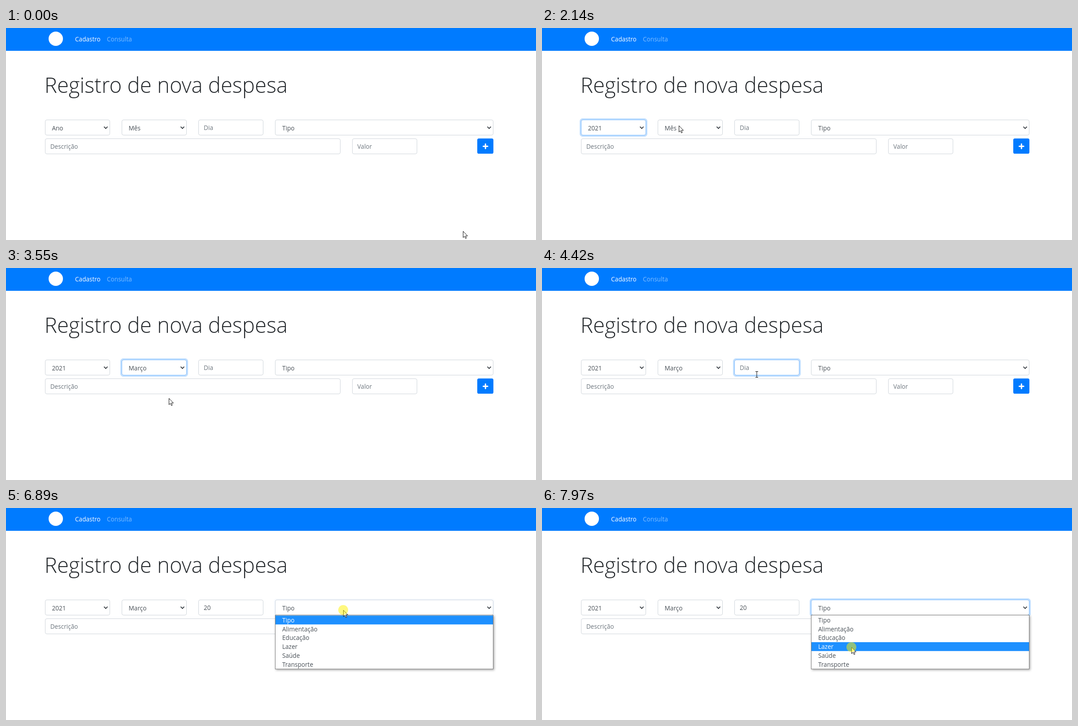
Animation, 1182 px wide and 474 px high, one loop 8000 ms. Source, as an HTML page:

```html
<!DOCTYPE html>
<html lang="pt-BR">
<head>
<meta charset="utf-8">
<title>Registro de nova despesa</title>
<style>
  html, body { margin: 0; width: 100%; height: 100%; overflow: hidden; background: #fff; }
  svg { display: block; width: 1182px; height: 474px; }
  text { font: 400 13.6px "Open Sans", "Noto Sans", sans-serif; fill: #495057; white-space: pre; }
  .title { font-size: 47.3px; font-weight: 300; fill: #212529; }
  .link { fill: #fff; }
  .dim { fill: #fff; opacity: .5; }
  .hint { fill: #6c757d; }
  .box { fill: #fff; stroke: #ced4da; }
  .ring { fill: none; stroke: #007bff; stroke-opacity: .25; stroke-width: 3; }
  .edge { fill: none; stroke: #80bdff; }
  .arrow { fill: none; stroke: #343a40; stroke-width: 1.8; }
  .list { fill: #fff; stroke: #767676; filter: drop-shadow(2px 2px 2.5px rgba(0, 0, 0, .35)); }
  .pick { fill: #1e90ff; }
  .on { fill: #fff; }
</style>
</head>
<body>
<svg viewBox="0 0 1182 474">
  <rect width="1182" height="51" fill="#007bff"/>
  <circle cx="111" cy="24" r="16" fill="#fff"/>
  <text class="link" x="154" y="30">Cadastro</text>
  <text class="dim" x="225" y="30">Consulta</text>
  <text class="title" x="85.8" y="145.3">Registro de nova despesa</text>
  <g id="fields"></g>
  <rect x="1051" y="247" width="36" height="34" rx="3.6" fill="#007bff"/>
  <path d="M1069.3 259.7v9.6M1064.5 264.5h9.6" stroke="#fff" stroke-width="3.2" stroke-linecap="round"/>
  <rect id="caret" y="214" width="1" height="19" fill="#343a40"/>
  <g id="lists"></g>
  <g id="pointer">
    <path id="tip" d="M.5.5V14.6L3.7 11.7 5.8 16.6 8 15.7 5.9 10.9H10.4Z" fill="#fff" stroke="#000" stroke-width=".95"/>
    <path id="beam" d="M-3-6.5H3M0-6.5V6.5M-3 6.5H3" fill="none" stroke="#000"/>
    <circle id="press" r="11" fill="#fff200" fill-opacity=".5"/>
  </g>
</svg>
<script>
const LOOP = 8000, REFRESH = 70;
const ROW = 19.83, LIST_TOP = 240.5, HEIGHT = 34;
const OPEN_DELAY = 130, FOCUS_DELAY = 120, CLOSE_DELAY = 70, FADE = 120;
const TRAVEL = 720, SETTLE = 160, LINGER = 100, PRESS = 145;
const BLINK = 530, KEYS = [5260, 5350];

const $ = id => document.getElementById(id);

function add(parent, tag, attrs, content = '') {
  const el = document.createElementNS('http://www.w3.org/2000/svg', tag);
  for (const key in attrs) el.setAttribute(key, attrs[key]);
  el.textContent = content;
  parent.append(el);
  return el;
}

const click = (at, x, y) => ({ at, x, y });

const fields = [
  { label: 'Ano', col: 0, span: 1, options: ['2020', '2021'], choice: '2021',
    enter: click(750, 145, 225), pick: click(1610, 150, 289) },
  { label: 'Mês', col: 1, span: 1, choice: 'Março',
    options: ['Janeiro', 'Fevereiro', 'Março', 'Abril', 'Maio', 'Junho', 'Julho',
      'Agosto', 'Setembro', 'Outubro', 'Novembro', 'Dezembro'],
    enter: click(2220, 305, 218), pick: click(3330, 330, 306) },
  { label: 'Dia', col: 2, span: 1, typed: '20', enter: click(3820, 479, 238) },
  { label: 'Tipo', col: 3, span: 3, options: ['Alimentação', 'Educação', 'Lazer', 'Saúde', 'Transporte'],
    enter: click(6760, 752, 228), pick: click(7740, 690, 311) },
  { label: 'Descrição', col: 0, span: 4, row: 1 },
  { label: 'Valor', col: 4, span: 1, row: 1 }
];

const clicks = fields.flatMap(f => [f.enter, f.pick]).filter(Boolean);
const entered = fields.filter(f => f.enter);
entered.forEach((f, i) => f.blur = entered[i + 1]?.enter.at ?? Infinity);

function build(f) {
  const g = $('fields'), left = 87.4 + 171.2 * f.col;
  const x = f.x = Math.floor(left) + .5;
  const y = f.y = f.row ? 247.5 : 205.5;
  const w = f.w = Math.round(171.2 * f.span - 27.2);
  const box = { x, y, width: w, height: HEIGHT, rx: 3.6 };
  add(g, 'rect', { ...box, class: 'box' });
  f.glow = add(g, 'g', { opacity: 0 });
  add(f.glow, 'rect', { x: x - 2, y: y - 2, width: w + 4, height: HEIGHT + 4, rx: 5, class: 'ring' });
  add(f.glow, 'rect', { ...box, class: 'edge' });
  f.text = add(g, 'text', { x: left + (f.options ? 15 : 11.3), y: y + (f.options ? 23.5 : 22.5) }, f.label);
  if (!f.options) {
    f.text.setAttribute('class', 'hint');
    return;
  }
  add(g, 'path', { d: `M${x + w - 13} ${y + 15.2}l4 4 4-4`, class: 'arrow' });

  const rows = [f.label, ...f.options];
  f.list = add($('lists'), 'g', {});
  add(f.list, 'rect', { x, y: LIST_TOP - 1, width: w, height: rows.length * ROW + 1.5, class: 'list' });
  f.mark = add(f.list, 'rect', { x: x + .5, width: w - 1, height: ROW, class: 'pick' });
  f.rows = rows.map((row, i) => add(f.list, 'text', { x: left + 15, y: LIST_TOP + 15.3 + i * ROW }, row));
}
fields.forEach(build);

const ramp = (t, start) => Math.min(1, Math.max(0, (t - start) / FADE));
const show = (el, visible) => el.setAttribute('visibility', visible ? 'inherit' : 'hidden');

// Glides to each click in turn and rests there until the next one is due.
function pointerAt(t) {
  let last = click(-Infinity, 1019, 454), { x, y } = last;
  for (const next of clicks) {
    const arrive = next.at - SETTLE;
    const leave = Math.max(0, last.at + LINGER, arrive - TRAVEL);
    if (t <= leave) break;
    const u = Math.min(1, (t - leave) / (arrive - leave)), e = u * u * (3 - 2 * u);
    x = last.x + (next.x - last.x) * e;
    y = last.y + (next.y - last.y) * e;
    last = next;
  }
  return [Math.round(x), Math.round(y)];
}

function valueOf(f, t) {
  if (f.typed) return f.typed.slice(0, KEYS.filter(k => t >= k).length);
  return f.choice && t >= f.pick.at + CLOSE_DELAY ? f.choice : '';
}

function drawList(f, py) {
  const current = Math.max(0, Math.floor((py - LIST_TOP) / ROW));
  f.mark.setAttribute('y', LIST_TOP + current * ROW);
  f.rows.forEach((row, i) => row.setAttribute('class', i === current ? 'on' : ''));
}

function drawCaret(t) {
  const day = fields[2], count = valueOf(day, t).length;
  const start = count === day.typed.length ? KEYS[1] : day.enter.at + CLOSE_DELAY;
  const lit = Math.floor((t - start) / BLINK) % 2 === 0;
  $('caret').setAttribute('x', 441 + count * 7.8);
  show($('caret'), t >= start && t < KEYS[1] + BLINK && lit);
}

function draw(t) {
  const [px, py] = pointerAt(t - t % REFRESH);
  let beam = false, listOpen = false;

  for (const f of fields) {
    const value = valueOf(f, t);
    f.text.textContent = value || f.label;
    if (f.enter) f.glow.setAttribute('opacity', ramp(t, f.enter.at + FOCUS_DELAY) - ramp(t, f.blur));
    if (f.options) {
      const open = t >= f.enter.at + OPEN_DELAY && t < f.pick.at + CLOSE_DELAY;
      const kept = open || (!f.choice && t >= f.pick.at);
      show(f.list, kept);
      if (kept) drawList(f, py);
      listOpen ||= kept;
    } else {
      f.text.setAttribute('class', value ? '' : 'hint');
      beam ||= px > f.x && px < f.x + f.w && py > f.y && py < f.y + HEIGHT;
    }
  }

  drawCaret(t);
  beam &&= !listOpen;
  $('pointer').setAttribute('transform', `translate(${px} ${py})`);
  show($('beam'), beam);
  show($('tip'), !beam);
  // The final press stays held until the loop ends.
  show($('press'), clicks.some((c, i) => t >= c.at && (t < c.at + PRESS || i === clicks.length - 1)));
}

function tick() {
  draw(performance.now() % LOOP);
  requestAnimationFrame(tick);
}
tick();
</script>
</body>
</html>
```
